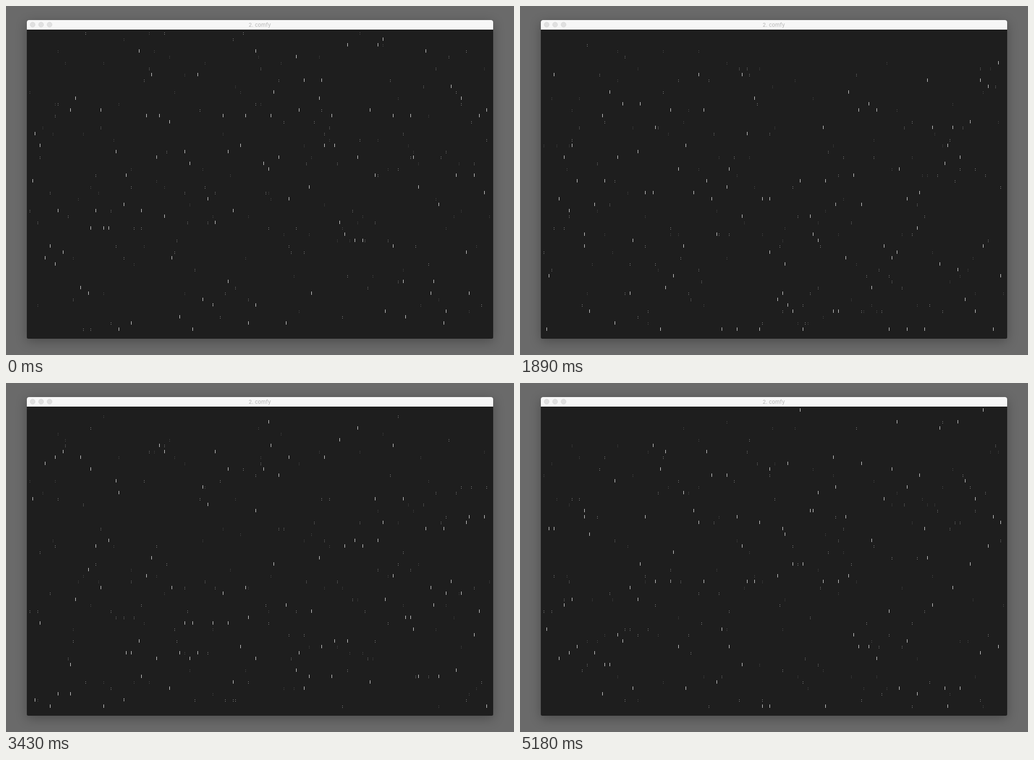
Animation of 902 by 621 pixels, one loop 5250 ms. Source, as an HTML page:

```html
<!DOCTYPE html>
<html lang="en">
<head>
<meta charset="utf-8">
<title>Terminal rain</title>
<style>
  html, body { margin: 0; width: 100%; height: 100%; overflow: hidden; background: #6a6a6a; }
  svg { position: absolute; left: 0; top: 0; display: block; }
  .window {
    position: absolute; left: 37px; top: 25px; width: 828px; height: 567px;
    border-radius: 4px 4px 3px 3px; background: #1e1e1e;
    box-shadow: 0 5px 20px rgba(0, 0, 0, .28), 0 0 1px rgba(0, 0, 0, .3);
  }
  text { font: 9.5px Inter, "Liberation Sans", sans-serif; fill: #b5b5b5; }
</style>
</head>
<body>
<div class="window"></div>
<svg width="902" height="621" viewBox="0 0 902 621">
  <path d="M37 42V29a4 4 0 0 1 4-4H861a4 4 0 0 1 4 4V42Z" fill="#f7f7f7"/>
  <g fill="#e0e0e0" stroke="#d2d2d2" stroke-width=".6">
    <circle cx="47.3" cy="33.2" r="4.4"/>
    <circle cx="62.3" cy="33.2" r="4.4"/>
    <circle cx="77.3" cy="33.2" r="4.4"/>
  </g>
  <text x="450.5" y="36.7" text-anchor="middle">2. comfy</text>
  <g id="rain" shape-rendering="crispEdges"></g>
</svg>
<script>
const STEP = 70, STEPS = 75, COLS = 182, ROWS = 51;
const PITCH_X = 816 / (COLS - 1), PITCH_Y = 10.53, LEFT = 42, TOP = 45;

// Speeds are in rows per tick; there are four ticks to every three steps.
const KINDS = [
  { count: 100, color: '#d2d2d2', speeds: [1, 2], shape: 'bar' },
  { count: 85, color: '#a0a0a0', speeds: [1.5, 3], shape: 'dots' },
  { count: 80, color: '#5c5c5c', speeds: [1.5, 3], shape: 'dots' }
];

const SHAPES = {
  bar: (x, y) => `M${x} ${y}h1v6h-1z`,
  dots: (x, y) => `M${x} ${y + 2}h1v1h-1zM${x} ${y + 5}h1v1h-1z`
};

function seeded(seed) {
  return () => {
    seed = (seed + 0x6D2B79F5) | 0;
    let n = Math.imul(seed ^ (seed >>> 15), 1 | seed);
    n = (n + Math.imul(n ^ (n >>> 7), 61 | n)) ^ n;
    return ((n ^ (n >>> 14)) >>> 0) / 4294967296;
  };
}

const random = seeded(41);
const pick = n => Math.floor(random() * n);

// Each drop keeps its column and re-enters a few rows below the top.
// Columns are jittered around an even spread so that drops rarely bunch up.
function makeDrops({ count, speeds }) {
  return Array.from({ length: count }, (_, i) => ({
    col: Math.floor((i + random()) / count * COLS),
    row: pick(ROWS),
    speed: speeds[pick(speeds.length)],
    entries: Array.from({ length: 8 }, () => pick(8))
  }));
}

function rowAt(drop, ticks) {
  let row = Math.floor(drop.row + drop.speed * ticks);
  for (let pass = 0; row >= ROWS; pass++) {
    row -= ROWS - drop.entries[pass % drop.entries.length];
  }
  return row;
}

const rain = document.getElementById('rain');
const layers = KINDS.map(kind => {
  const path = document.createElementNS('http://www.w3.org/2000/svg', 'path');
  path.setAttribute('fill', kind.color);
  rain.append(path);
  return { path, drops: makeDrops(kind), shape: SHAPES[kind.shape] };
});

function draw(step) {
  const ticks = Math.floor(step * 4 / 3);
  for (const { path, drops, shape } of layers) {
    path.setAttribute('d', drops.map(drop => shape(
      Math.round(LEFT + drop.col * PITCH_X),
      Math.round(TOP + rowAt(drop, ticks) * PITCH_Y)
    )).join(''));
  }
}

const start = performance.now();
let shown = 0;
draw(0);

function tick() {
  const step = Math.floor((performance.now() - start) / STEP) % STEPS;
  if (step !== shown) draw(shown = step);
  requestAnimationFrame(tick);
}
requestAnimationFrame(tick);
</script>
</body>
</html>
```
